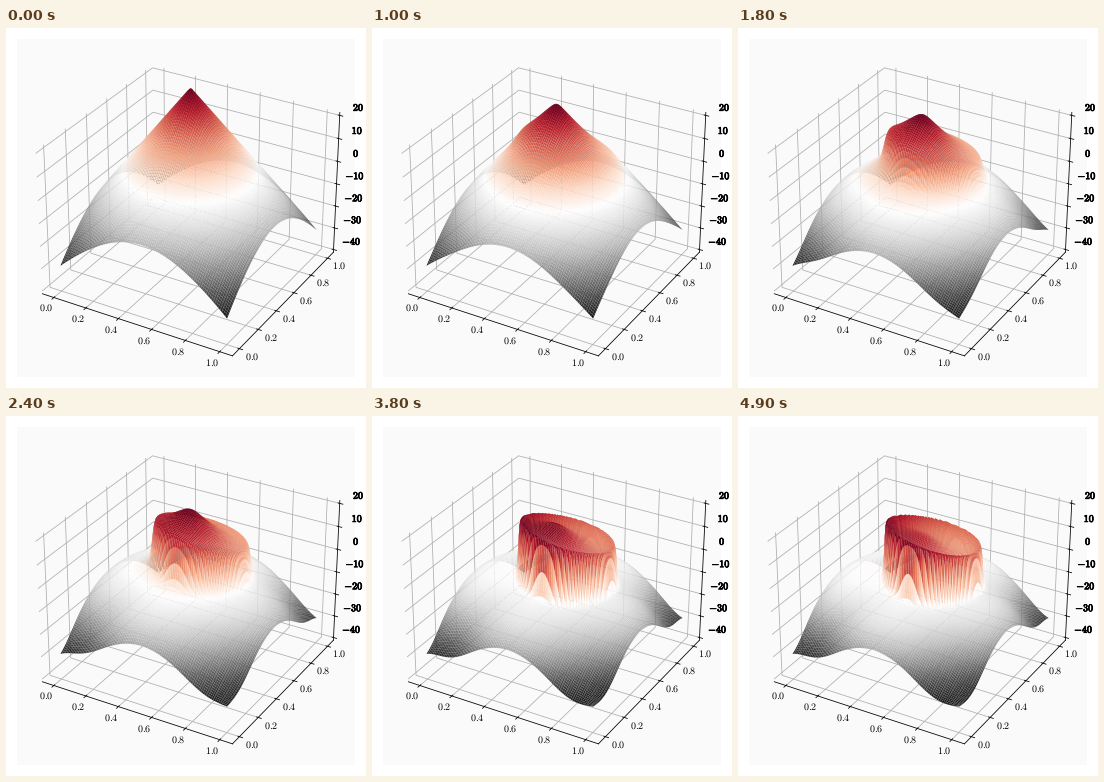
These frames come from a looping animation (360 px wide and 360 px high, 5000 ms). A matplotlib script:

```python
import numpy as np
import matplotlib.pyplot as plt
from matplotlib.animation import FuncAnimation
from matplotlib.collections import PolyCollection
from matplotlib.patheffects import withStroke
from mpl_toolkits.mplot3d import proj3d

plt.rcParams["mathtext.fontset"] = "cm"
plt.rcParams["text.hinting"] = "none"

SIZE, DPI = 360, 72
FRAMES, INTERVAL = 50, 100
POINTS = 100
PEAK, SLOPE = 39.5, 98.0                # starting cone
CENTER, RADIUS = (0.537, 0.551), 0.257  # plateau footprint
FLOOR, BLEND = -5.0, 4.0                # level the outer skirt sinks to

axis_points = np.linspace(0, 1, POINTS)
X, Y = np.meshgrid(axis_points, axis_points, indexing="ij")
DX, DY = np.abs(X - 0.5), np.abs(Y - 0.5)
R = np.hypot(DX, DY)
CONE = PEAK - SLOPE * R
RHO = np.hypot(X - CENTER[0], Y - CENTER[1]) / RADIUS

# The two near edges sag between their corners, folding along the diagonal.
FRONT = 1 / (1 + np.exp((Y - X) / 0.08))
EDGE = 4 * np.maximum(DX, DY) ** 2 * (1 - (4 * DX * DY) ** 4)
HOLLOW = np.exp(-((DX - 0.36) ** 2 + (DY - 0.36) ** 2) / 0.04)
HOLLOW *= 1 - (4 * DX * DY) ** 6
SKIRT = FLOOR - BLEND * np.log1p(np.exp((FLOOR - CONE) / BLEND))
SKIRT -= FRONT * (6 * EDGE + 8 * HOLLOW)


def height(t):
    """Surface height after t seconds."""
    fall = 1 - np.exp(-(t / 2.1) ** 2.6)
    sink = 26 * (1 - np.exp(-t / 4.2))
    outer = CONE + fall * (SKIRT - CONE)
    tip = PEAK - SLOPE * np.hypot(R, 0.02 * t)
    inner = tip - sink * (1 - RHO ** 2) + fall * (1.5 + 3 * RHO ** 12)
    softness = 0.015 + 0.15 * np.exp(-t)
    inside = 1 / (1 + np.exp((RHO - 1) / softness))
    return np.where(inside > 1e-4, outer + inside * (inner - outer), outer)


def quads(grid):
    """Corner values of every cell, one row per cell."""
    corners = (grid[:-1, :-1], grid[:-1, 1:], grid[1:, 1:], grid[1:, :-1])
    return np.stack([c.ravel() for c in corners], axis=-1)


class Surface(PolyCollection):
    """Cells projected and depth-sorted together, far ones first."""

    def set_heights(self, z):
        self.cells = quads(X), quads(Y), quads(z)

    def do_3d_projection(self):
        flat = [c.ravel() for c in self.cells]
        px, py, depth = (np.asarray(p).reshape(-1, 4)
                         for p in proj3d.proj_transform(*flat, self.axes.M))
        order = np.argsort(-depth.mean(axis=1))
        means = self.cells[2].mean(axis=1)
        self.set_verts(np.stack([px, py], axis=-1)[order])
        self.set_array(means[order])
        self.set_clim(means.min(), means.max())
        return depth.min()


def padded(low, high):
    margin = (high - low) / 48
    return low - margin, high + margin


fig = plt.figure(figsize=(SIZE / DPI, SIZE / DPI), dpi=DPI, facecolor="white")
ax = fig.add_axes([0.03, 0.03, 0.94, 0.94], projection="3d", facecolor="#fafafa")
ax.view_init(elev=30, azim=-60)
ax.set_xlim(*padded(-0.05, 1.05))
ax.set_ylim(*padded(-0.05, 1.05))
ax.set_zlim(*padded(-40, 20))

unit_ticks = np.linspace(0, 1, 6)
unit_labels = [f"${v:.1f}$" for v in unit_ticks]
levels = range(-40, 21, 10)
ax.set_xticks(unit_ticks, unit_labels, va="bottom")
ax.set_yticks(unit_ticks, unit_labels, va="bottom")
ax.set_zticks(levels, [f"${v}$" for v in levels], va="bottom",
              path_effects=[withStroke(linewidth=0.8, foreground="black")])
for axis in (ax.xaxis, ax.yaxis, ax.zaxis):
    axis.set_pane_color((1, 1, 1, 0))
    axis.pane.set_edgecolor("#efefef")

surface = Surface([], cmap="RdGy_r", linewidths=0)
ax.add_collection(surface, autolim=False)


def update(frame):
    surface.set_heights(height(frame * INTERVAL / 1000))
    return (surface,)


update(0)
anim = FuncAnimation(fig, update, frames=FRAMES, interval=INTERVAL,
                     repeat=True, repeat_delay=0, blit=False)
plt.show()
```
